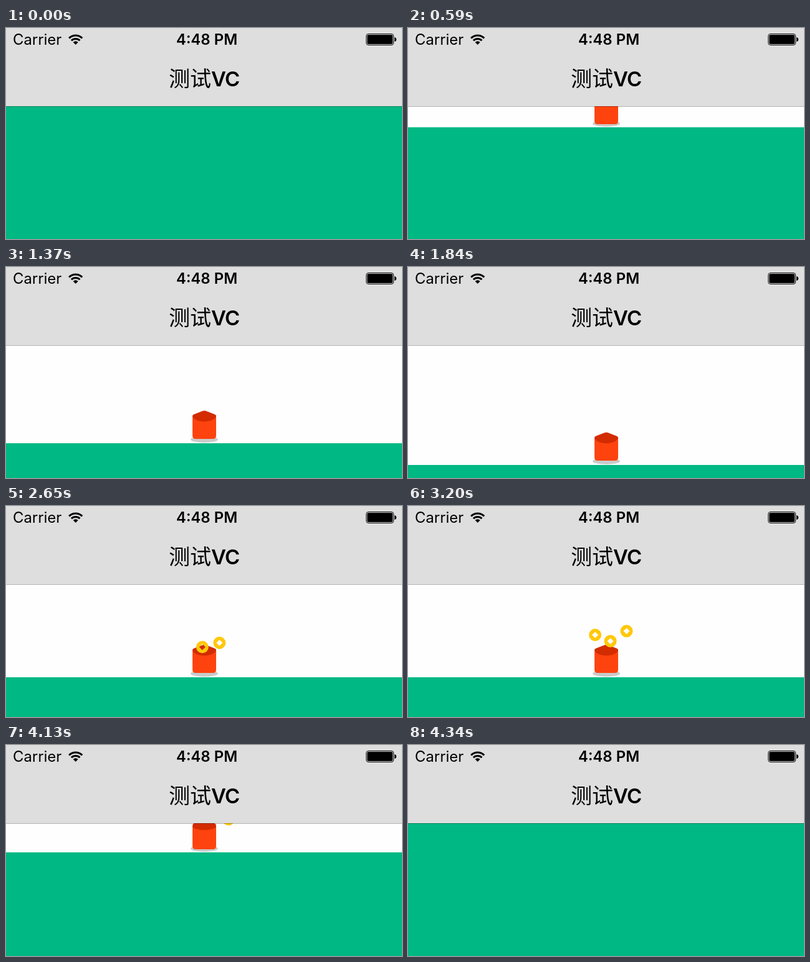
Write an HTML page that moves like this. It is 637 by 340 pixels and loops after 4.61 s.

```html
<!DOCTYPE html>
<html lang="zh">
<head>
<meta charset="utf-8">
<title>Pull to refresh</title>
<style>
  html, body { margin: 0; width: 100%; height: 100%; overflow: hidden; background: #fff; }
  svg { display: block; width: 637px; height: 340px; }
  text { font-family: Inter, Roboto, sans-serif; font-size: 24px; }
  .cjk { font: 500 34px "Noto Sans CJK SC", "Noto Sans CJK", sans-serif; }
  .title { font-size: 33px; font-weight: 600; letter-spacing: -.8px; }
</style>
</head>
<body>
<svg viewBox="0 0 637 340">
  <defs>
    <path id="coin" fill="#ffc80a" fill-rule="evenodd"
      d="M-10 0A10 10 0 1 1 10 0A10 10 0 1 1 -10 0ZM0 -5L5 0L0 5L-5 0Z"/>
  </defs>
  <rect width="637" height="340" fill="#fefefe"/>
  <g id="header">
    <ellipse cx="319" cy="-6" rx="22" ry="5" fill="#c9cbcb"/>
    <path id="flap" fill="#d32c00"/>
    <g id="coins"></g>
    <path id="front" fill="#ff430e"/>
  </g>
  <rect id="panel" width="637" height="340" fill="#00b884"/>

  <rect width="637" height="126" fill="#dedede"/>
  <rect y="126" width="637" height="1" fill="#000" fill-opacity=".3"/>
  <text x="11" y="27">Carrier</text>
  <g fill="none" stroke="#000" stroke-width="3">
    <path d="M101.4 16.4A15 15 0 0 1 122.6 16.4"/>
    <path d="M105.2 20.2A9.6 9.6 0 0 1 118.8 20.2"/>
  </g>
  <path d="M112 27L108 23A5.7 5.7 0 0 1 116 23Z"/>
  <text x="323" y="27" text-anchor="middle" font-weight="600">4:48 PM</text>
  <rect x="579.5" y="9.5" width="44" height="18" rx="3.5" fill="none" stroke="#000"/>
  <rect x="581" y="11" width="41" height="15" rx="2"/>
  <path d="M625 15Q628 15.5 628 18.5T625 22Z"/>
  <text class="cjk" x="262" y="94">测试</text>
  <text class="title" x="330" y="94">VC</text>
</svg>
<script>
const LOOP = 4610, TOP = 126, REST = 276;
const $ = id => document.getElementById(id);
const clamp = v => Math.max(0, Math.min(1, v));
const mix = (a, b, p) => a + (b - a) * p;
const smooth = p => (1 - Math.cos(Math.PI * clamp(p))) / 2;

// finger drag: time, top edge of the panel
const DRAG = [[360, 126], [700, 180], [910, 206], [1140, 246], [1370, 284],
  [1600, 305], [1840, 319], [2040, 324], [2165, 324]];

// start time, sideways reach, arc height
const FLIGHT = 560;
const COINS = [[2398, 54, 20], [2622, -62, 38], [2850, 52, 44], [3000, -50, 34],
  [3140, 60, 46], [3314, -61, 15.5], [3740, 56, 25]];

function slope(i) {
  const a = DRAG[i - 1], b = DRAG[i + 1];
  return a && b ? (b[1] - a[1]) / (b[0] - a[0]) : 0;
}

function drag(t) {
  const i = DRAG.findIndex((_, k) => t < DRAG[k + 1][0]);
  const [t0, v0] = DRAG[i], [t1, v1] = DRAG[i + 1];
  const d = t1 - t0, u = (t - t0) / d, w = 1 - u;
  return v0 * w * w * (1 + 2 * u) + v1 * u * u * (3 - 2 * u)
    + d * u * w * (slope(i) * w - slope(i + 1) * u);
}

function panelTop(t) {
  if (t < 360) return TOP;
  if (t < 2165) return drag(t);
  if (t < 3790) return mix(324, REST, smooth((t - 2165) / 455));
  return mix(REST, TOP, smooth((t - 3790) / 550));
}

// envelope drawn relative to the panel edge; p opens the flap
function drawPacket(p) {
  const b = -5 - 2 * p;
  const side = b - 36, rim = b + mix(-29.3, -25.3, p);
  const shoulder = b + mix(-42, -38.8, p), bend = b + mix(-42, -40.2, p);
  const roof = b + mix(-42, -44.6, p), tip = b + mix(-42, -46.4, p);
  const mouth = `C305 ${rim} 333 ${rim} 338 ${side}`;
  $('flap').setAttribute('d', `M300 ${side}V${b - 37}Q300 ${shoulder} 304 ${bend}
    L315 ${roof}Q319 ${tip} 323 ${roof}L334 ${bend}Q338 ${shoulder} 338 ${b - 37}
    V${side + 1}C333 ${rim + 1} 305 ${rim + 1} 300 ${side + 1}Z`);
  $('front').setAttribute('d', `M300 ${side}${mouth}V${b - 5}Q338 ${b} 333 ${b}
    H305Q300 ${b} 300 ${b - 5}Z`);
}

const coins = COINS.map(() => {
  const el = document.createElementNS('http://www.w3.org/2000/svg', 'use');
  el.setAttribute('href', '#coin');
  return $('coins').appendChild(el);
});

function drawCoins(t) {
  COINS.forEach(([start, reach, rise], i) => {
    const s = (t - start) / FLIGHT, el = coins[i];
    const on = s >= 0 && s < 1;
    el.setAttribute('visibility', on ? 'visible' : 'hidden');
    if (!on) return;
    const x = 319 + reach * s, y = -42 - 4 * rise * s * (1 - s) + 14 * s;
    el.setAttribute('transform', `translate(${x.toFixed(2)} ${y.toFixed(2)})`);
    el.setAttribute('opacity', clamp((1 - s) / .1));
  });
}

const origin = performance.now();
function frame() {
  const t = Math.max(0, performance.now() - origin) % LOOP;
  const y = Math.max(TOP, Math.round(panelTop(t)));
  $('panel').setAttribute('y', y);
  $('header').setAttribute('transform', `translate(0 ${y})`);
  drawPacket(clamp((y - 206) / 64));
  drawCoins(t);
  requestAnimationFrame(frame);
}
frame();
</script>
</body>
</html>
```
